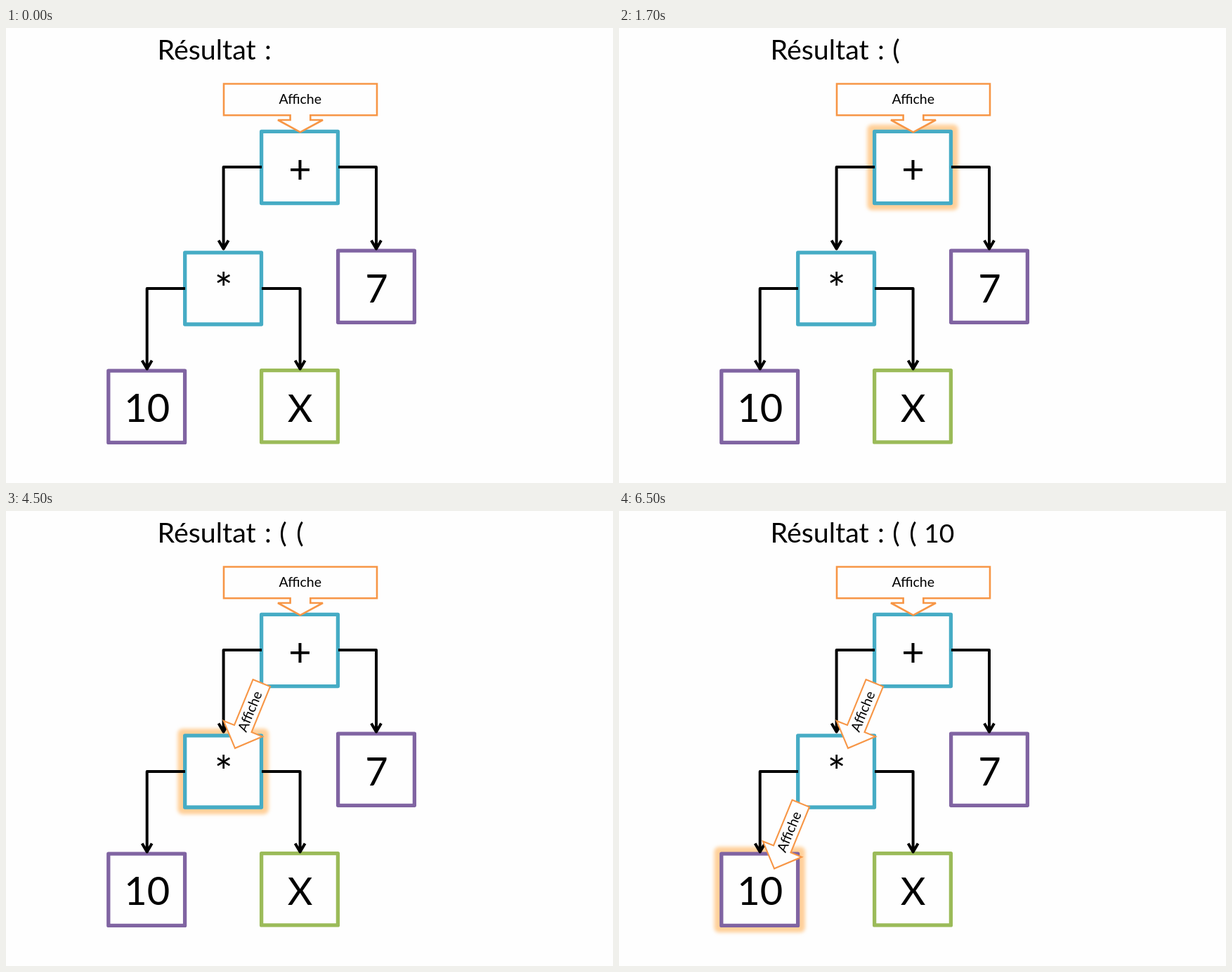
These frames come from a looping animation (864 px wide and 648 px high, 8 s). An HTML page:

```html
<!DOCTYPE html>
<html lang="fr">
<head>
<meta charset="utf-8">
<title>Arbre d'expression</title>
<style>
  html, body { margin: 0; width: 100%; height: 100%; overflow: hidden; background: #fefefe; }
  svg { display: block; width: 864px; height: 648px; }
  text { font-family: Lato, "Open Sans", sans-serif; fill: #000; }
  .mid { text-anchor: middle; }
  .title { font-size: 39.4px; }
  .num { font-size: 37.2px; }
  .label { font-size: 19.5px; }
  .box { fill: #fefefe; stroke-width: 5.3; stroke-linejoin: round; }
  .glow { fill: #ffd09a; filter: url(#soft); }
  .link { fill: none; stroke: #000; stroke-width: 4; stroke-linejoin: round; }
  .call { fill: #fefefe; stroke: #f79646; stroke-width: 2.6; }
  .slant { stroke-width: 2.1; }
</style>
</head>
<body>
<svg id="stage" viewBox="0 0 864 648">
  <defs>
    <filter id="soft" x="-20%" y="-20%" width="140%" height="140%">
      <feGaussianBlur stdDeviation="2.7"/>
    </filter>
  </defs>
</svg>
<script>
const LOOP = 8000;
const BLUE = '#46acc5', PURPLE = '#8064a2', GREEN = '#9bbb59';
const stage = document.getElementById('stage');
const timed = [];

function add(tag, attrs, text) {
  const el = document.createElementNS('http://www.w3.org/2000/svg', tag);
  for (const key in attrs) el.setAttribute(key, attrs[key]);
  if (text) el.textContent = text;
  stage.appendChild(el);
  return el;
}

// Show an element only within [from, to)
function during(el, from, to = LOOP) {
  timed.push({ el, from, to });
}

function write(text, x, y, cls, extra) {
  return add('text', { x, y, class: cls, ...extra }, text);
}

// Box given by its centre; w and h run along the middle of the border
function glow(cx, cy, from, to) {
  const w = 129.5, h = 122;
  during(add('rect', { class: 'glow', x: cx - w / 2, y: cy - h / 2, width: w, height: h, rx: 7 }), from, to);
}

function box(cx, cy, color) {
  const w = 108.8, h = 102.2;
  add('rect', { class: 'box', stroke: color, x: cx - w / 2, y: cy - h / 2, width: w, height: h });
}

function link(x0, x1, y0, y1) {
  add('path', {
    class: 'link',
    d: `M${x0} ${y0}H${x1}V${y1}M${x1 - 7} ${y1 - 12}L${x1} ${y1}L${x1 + 7} ${y1 - 12}`
  });
}

function slant(dx, dy, from) {
  const transform = `translate(${dx} ${dy})`;
  during(add('path', {
    class: 'call slant', transform,
    d: 'M351.5 240L376 250L349.5 315L365 321.3L326 337.8L309.8 299L325 305Z'
  }), from);
  during(write('Affiche', 0, 6.3, 'label mid', {
    transform: `${transform} translate(347.6 285.5) rotate(-67.8)`
  }), from);
}

const nodes = [
  // cx, cy, colour, sign, baseline, font size
  [418, 198.5, BLUE, '+', 221, 56],
  [309.1, 370.9, BLUE, '*', 394, 62],
  [527, 368.2, PURPLE, '7', 390.5, 56],
  [200.2, 539.3, PURPLE, '10', 561, 56],
  [418, 538.8, GREEN, 'X', 560.5, 55]
];

glow(418, 198.5, 500, 2500);
glow(309.1, 370.9, 4500, 6500);
glow(200.2, 539.3, 6500);

for (const [cx, cy, color, sign, base, size] of nodes) {
  box(cx, cy, color);
  write(sign, cx + 0.5, base, 'mid', { 'font-size': size });
}

link(364, 309.6, 198, 314.5);
link(473, 527, 198, 314.5);
link(255, 200.7, 371, 485.5);
link(364, 418.6, 371, 485.5);

add('path', {
  class: 'call',
  d: 'M310 79.5H528V124.3H433.3V131H451L418.8 148.3L387 131H404.6V124.3H310Z'
});
write('Affiche', 418.7, 108, 'label mid');
slant(0, 0, 2500);
slant(-105, 171.5, 6500);

write('Résultat', 215.5, 45, 'title');
write(':', 373, 45, 'title mid');
during(write('(', 394.5, 45, 'title mid'), 500);
during(write('(', 418.5, 45, 'title mid'), 4500);
during(write('10', 455.8, 45, 'num mid'), 6500);

const start = performance.now();

function draw(now) {
  const t = Math.max(0, now - start) % LOOP;
  for (const { el, from, to } of timed) {
    el.style.visibility = t >= from && t < to ? 'visible' : 'hidden';
  }
  requestAnimationFrame(draw);
}

draw(start);
</script>
</body>
</html>
```
